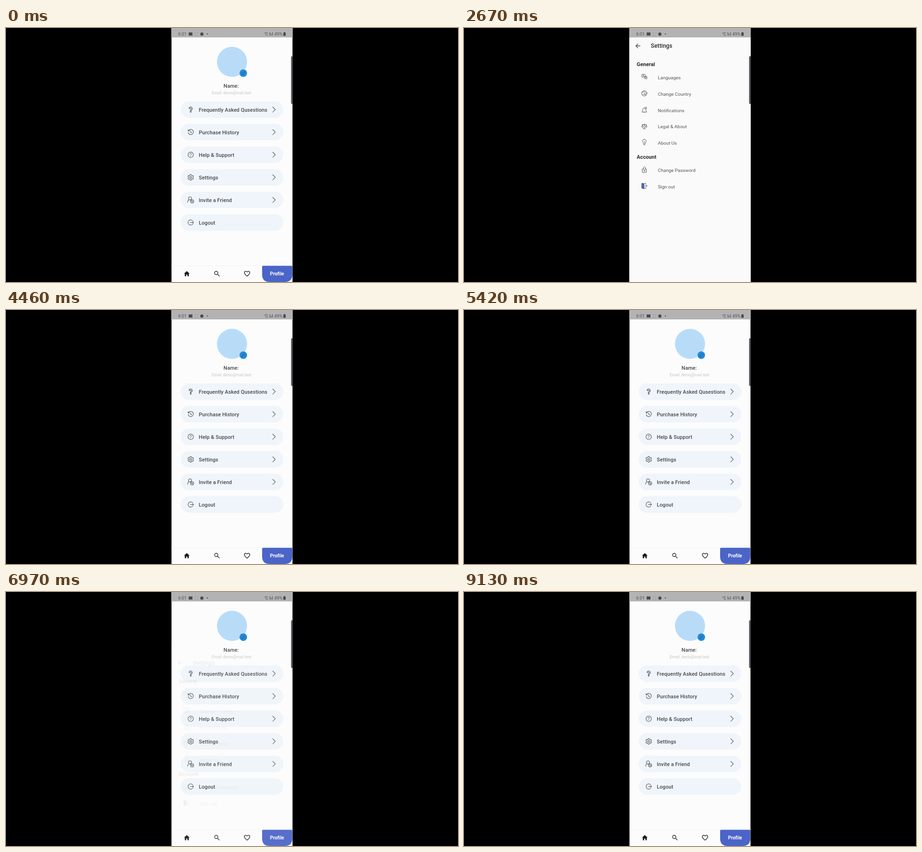
An HTML page for the animation above (9170 ms loop, 960 by 540 pixels).

```html
<!DOCTYPE html>
<html lang="en">
<head>
<meta charset="utf-8">
<title>Profile and settings</title>
<style>
html, body { margin: 0; width: 100%; height: 100%; overflow: hidden; background: #000; }
svg { display: block; width: 960px; height: 540px; font-family: Roboto, "Open Sans", sans-serif; }

.row { font-size: 11px; font-weight: 500; letter-spacing: .07px; fill: #48484b; }
.title { font-size: 12.3px; font-weight: 500; fill: #2a2a2c; }
.head { font-size: 11.2px; font-weight: 700; fill: #2a2a2c; }
.item { font-size: 9.95px; fill: #555558; }
.small { font-size: 9.4px; fill: #55555a; }
.line { fill: none; stroke: #4c4c50; stroke-width: 1.05; stroke-linecap: round; stroke-linejoin: round; }
.thin { stroke-width: .9; }
.bold { stroke-width: 1.3; }
.nav { stroke: #2c2c2e; stroke-width: 1.4; }

/* The settings page rises while fading in, and leaves the same way backwards. */
.sheet { animation: fade 9170ms infinite, rise 9170ms infinite; }
.back { animation: swipe 9170ms linear infinite; }

@keyframes fade {
  0%, 76.729%, 100% { opacity: 0; }
  22.41%, 60.196% { opacity: 0; animation-timing-function: cubic-bezier(.42, 0, 1, 1); }
  25.682%, 63.468% { opacity: 1; }
  42.334%, 73.457% { opacity: 1; animation-timing-function: cubic-bezier(0, 0, .58, 1); }
  45.605% { opacity: 0; }
}
@keyframes rise {
  0%, 76.729%, 100% { transform: translateY(135px); }
  22.41%, 60.196% { transform: translateY(135px); animation-timing-function: cubic-bezier(.4, 0, .2, 1); }
  25.682%, 63.468% { transform: translateY(0); }
  42.334%, 73.457% { transform: translateY(0); animation-timing-function: cubic-bezier(.8, 0, .6, 1); }
  45.605% { transform: translateY(135px); }
}
@keyframes swipe {
  0%, 40.567%, 71.712%, 100% { opacity: 0; transform: translateX(22px); }
  41.439%, 43.729%, 72.585%, 74.809% { opacity: 1; transform: translateX(0); }
  44.493%, 75.573% { opacity: 0; transform: translateX(0); }
  44.6%, 75.7% { opacity: 0; transform: translateX(22px); }
}
</style>
</head>
<body>
<svg viewBox="0 0 960 540">
  <defs>
    <clipPath id="screen"><rect x="351.5" width="257" height="540"/></clipPath>
    <rect id="pill" x="371" y="-17.5" width="218" height="35" rx="17.5" fill="#eff5fa"/>
    <path id="chevron" class="line" d="M566.5-5.5 572-.2 566.5 5.5"/>
  </defs>

  <g clip-path="url(#screen)">
    <rect x="351" width="258" height="540" fill="#fcfcfd"/>

    <!-- Profile page -->
    <circle cx="480" cy="72" r="32" fill="#b8dcf8"/>
    <circle cx="504" cy="96" r="8" fill="#218bdb"/>
    <path class="line thin" d="M501 99l.6-2.2 4.3-4.3 1.6 1.6-4.3 4.3z"/>
    <text class="row" x="478.3" y="127.3" text-anchor="middle">Name:</text>
    <text x="479" y="141.3" text-anchor="middle" font-size="8.2" fill="#c6c6c6">Email: demo@mail.test</text>

    <g transform="translate(0 173.5)">
      <use href="#pill"/><use href="#chevron"/>
      <path class="line" d="M388.8-2.2a3.5 3.5 0 1 1 5 3.1q-.5.3-.5 1.4h-2q-.2-2 1.2-2.7a1.6 1.6 0 1 0-1.9-1.8z"/>
      <circle class="line" cx="392.3" cy="4.4" r="1.2"/>
      <text class="row" x="409.5" y="4">Frequently Asked Qusestions</text>
    </g>
    <g transform="translate(0 221.5)">
      <use href="#pill"/><use href="#chevron"/>
      <path class="line" d="M387.3-2.7a5.6 5.6 0 1 1-.4 3.4M386.7-5.4l.4 3 3-.3M392.3-3V.4l2.6 1"/>
      <text class="row" x="409.5" y="4">Purchase History</text>
    </g>
    <g transform="translate(0 269.5)">
      <use href="#pill"/><use href="#chevron"/>
      <circle class="line" cx="392.3" r="5.7"/>
      <path class="line thin" d="M390.6-1.4a1.7 1.7 0 1 1 2.5 1.5q-.8.4-.8 1.3M392.3 3v.1"/>
      <text class="row" x="409.5" y="4">Help &amp; Support</text>
    </g>
    <g transform="translate(0 317.5)">
      <use href="#pill"/><use href="#chevron"/>
      <path class="line" d="M391.1-6h2.4l.5 1.8 1.3.7 1.8-.5 1.2 2-1.3 1.3v1.4l1.3 1.3-1.2 2-1.8-.5-1.3.7-.5 1.8h-2.4l-.5-1.8-1.3-.7-1.8.5-1.2-2 1.3-1.3v-1.4l-1.3-1.3 1.2-2 1.8.5 1.3-.7z"/>
      <circle class="line" cx="392.3" r="2"/>
      <text class="row" x="409.5" y="4">Settings</text>
    </g>
    <g transform="translate(0 365.5)">
      <use href="#pill"/><use href="#chevron"/>
      <circle class="line" cx="390.8" cy="-3.3" r="3.3"/>
      <path class="line" d="M385.7 5q0-4.3 3.5-5M392.5 0l1 .4"/>
      <circle class="line" cx="395.3" cy="3" r="3.5"/>
      <path class="line thin" d="M393.6 3h3.4M395.3 1.3v3.4"/>
      <text class="row" x="409.5" y="4">Invite a Friend</text>
    </g>
    <g transform="translate(0 413.5)">
      <use href="#pill"/>
      <path class="line" d="M396.7-3.5a5.6 5.6 0 1 0 0 7M391.5 0h6.8M396.4-2l2 2-2 2"/>
      <text class="row" x="409.5" y="4">Logout</text>
    </g>

    <!-- Bottom bar -->
    <path d="M351 505.5h193" stroke="#f3f3f5"/>
    <path fill="#1c1c1e" d="M384 516.8l6 5.4h-1.7v5.6h-3v-3.5h-2.6v3.5h-3v-5.6H378z"/>
    <circle class="line nav" cx="446.5" cy="520.8" r="3.5"/>
    <path class="line nav" d="M449.3 523.6l3.7 3.7"/>
    <path class="line nav" d="M512 527.6q-5.7-4.6-5.7-7.3c0-3.6 4.2-4.2 5.7-1.4 1.5-2.8 5.7-2.2 5.7 1.4q0 2.7-5.7 7.3z"/>
    <path fill="#4b64c8" d="M546 505.5h60q2 0 2 2V524q0 16-16 16h-32q-16 0-16-16v-16.5q0-2 2-2z"/>
    <text x="575.6" y="526.2" text-anchor="middle" font-size="10" font-weight="700" fill="#fff">Profile</text>

    <!-- Settings page -->
    <g class="sheet">
      <rect x="351" width="258" height="540" fill="#fafafb"/>
      <path class="line bold" d="M374 38h-8.8M369.3 33.7L365 38l4.3 4.3"/>
      <text class="title" x="396.8" y="42.3">Settings</text>
      <text class="head" x="366.8" y="80.6">General</text>
      <text class="head" x="366.8" y="277.6">Account</text>
      <g class="item">
        <text x="411.7" y="109">Languages</text>
        <text x="411.7" y="143.8">Change Country</text>
        <text x="411.7" y="178.6">Notifications</text>
        <text x="411.7" y="213.4">Legal &amp; About</text>
        <text x="411.7" y="248.2">About Us</text>
        <text x="411.7" y="306">Change Password</text>
        <text x="411.7" y="340.8">Sign out</text>
      </g>
      <g class="line thin">
        <path d="M378.5 98.5h5.5q1 0 1 1v3.5q0 1-1 1h-3.5l-2 1.5-.8-2v-4q0-1 .8-1zM383 104v2.5q0 1 1 1h2.5l1.5 1.2.5-1.6v-3.6q0-1-1-1H385M379.8 102.5l1.3-2.7 1.3 2.7M384.8 104.5h2.4M386 103.8v2.4"/>
        <circle cx="383" cy="139" r="5.6"/>
        <path d="M378 136.5q4 1.5 5-3M379 143q2-3.5 4.5-2t4-3.5M383 138.5l2.5 5M386 135l-2 2.5"/>
        <path d="M378 178.5q1.5-1.5 1.5-4.5 0-4 3.5-4t3.5 4q0 3 1.5 4.5zM381.7 178.7q1.3 1.8 2.6 0"/>
        <circle cx="386" cy="170" r="1.9" fill="#fafafb"/>
        <path d="M383 203.5v10.5M380 214h6M378.5 205.5h9M377.3 210.5l1.7-4.5 1.8 4.5q-1.8 1.8-3.5 0zM385.2 210.5l1.8-4.5 1.7 4.5q-1.7 1.8-3.5 0z"/>
        <path d="M381.3 246q0-1.7-1.2-2.7a4 4 0 1 1 5.8 0q-1.2 1-1.2 2.7zM381.6 248.3h2.8M383 241v3"/>
        <path d="M379 300h8.4v7H379zM380.7 300v-2a2.5 2.5 0 0 1 5 0v2M383.2 302.5v2M381.3 303.5h3.8"/>
        <path d="M383 330.3h3v2.5M386 338.5v2.3h-3M384.3 335.6h4.5M387 333.6l2 2-2 2"/>
      </g>
      <path fill="#5068c4" stroke="#2e3658" stroke-width=".8" d="M377.5 330l4.8 1v10.8l-4.8-1.3z"/>
    </g>

    <path class="back line" d="M590.5 260.5l-6 5.7 6 5.7"/>

    <!-- System overlay -->
    <rect x="351" width="258" height="20" fill="#b3b3b4"/>
    <text class="small" x="365.8" y="16.2">6:01</text>
    <rect x="388" y="9.5" width="8" height="6.5" fill="#4a4a4e"/>
    <path d="M401 10.5h2M406 10.5h2M401 15.5h2M406 15.5h2" stroke="#88888c"/>
    <circle cx="416" cy="13" r="3.4" fill="#4a4a4e"/>
    <circle cx="427.7" cy="12.7" r="1.2" fill="#4a4a4e"/>
    <path class="line thin" d="M548.8 10.8q3.7-2.8 7.4 0M550.3 13q2.2-1.7 4.4 0M552.5 15.3l3.5.5"/>
    <path d="M560.5 9v7M563 12v4M566 9v7" stroke="#55555a" stroke-width="1.2"/>
    <text class="small" x="570" y="16.2">49%</text>
    <path fill="#4a4a4e" d="M590.5 8.8h2v1h1.5v6.7h-5V9.8h1.5z"/>
    <rect x="605.5" y="60" width="8" height="101.5" rx="2" fill="#50525a"/>
  </g>
</svg>
</body>
</html>
```
